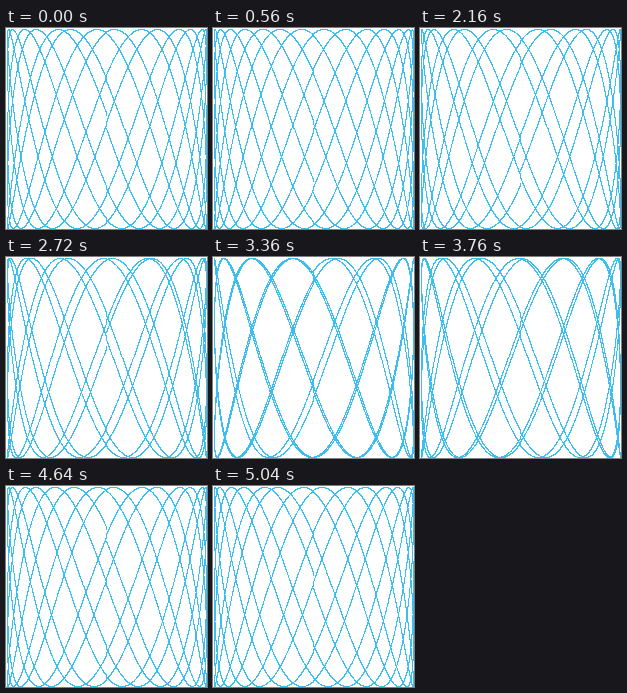
Animation of 201x201 px, one loop 5.12 s. Source, as an HTML page with a canvas:

```html
<!DOCTYPE html>
<html>
<head>
<meta charset="utf-8">
<title>Lissajous</title>
<style>
html, body { margin: 0; width: 100%; height: 100%; overflow: hidden; background: #fff; }
canvas { display: block; width: 201px; height: 201px; image-rendering: pixelated; }
</style>
</head>
<body>
<canvas id="stage" width="201" height="201"></canvas>
<script>
const R = 100, SIZE = 2 * R + 1;
const CYCLES = 5, STEP = 0.001;
const FREQ = 2.7957;
const FRAMES = 64, DELAY = 80, PHASE_STEP = 0.1;

const ctx = document.getElementById('stage').getContext('2d');
const image = ctx.createImageData(SIZE, SIZE);
const pixels = new Uint32Array(image.data.buffer);
const PAPER = 0xffffffff, INK = 0xfff0be3c; // ABGR

const plot = v => R + Math.trunc(v * R + 0.5);

function draw(phase) {
  pixels.fill(PAPER);
  for (let t = 0; t < CYCLES * 2 * Math.PI; t += STEP) {
    pixels[plot(Math.sin(t * FREQ + phase)) * SIZE + plot(Math.sin(t))] = INK;
  }
  ctx.putImageData(image, 0, 0);
}

let shown = -1;
function tick() {
  const frame = Math.floor(performance.now() / DELAY) % FRAMES;
  if (frame !== shown) {
    shown = frame;
    draw(frame * PHASE_STEP);
  }
  requestAnimationFrame(tick);
}
tick();
</script>
</body>
</html>
```
